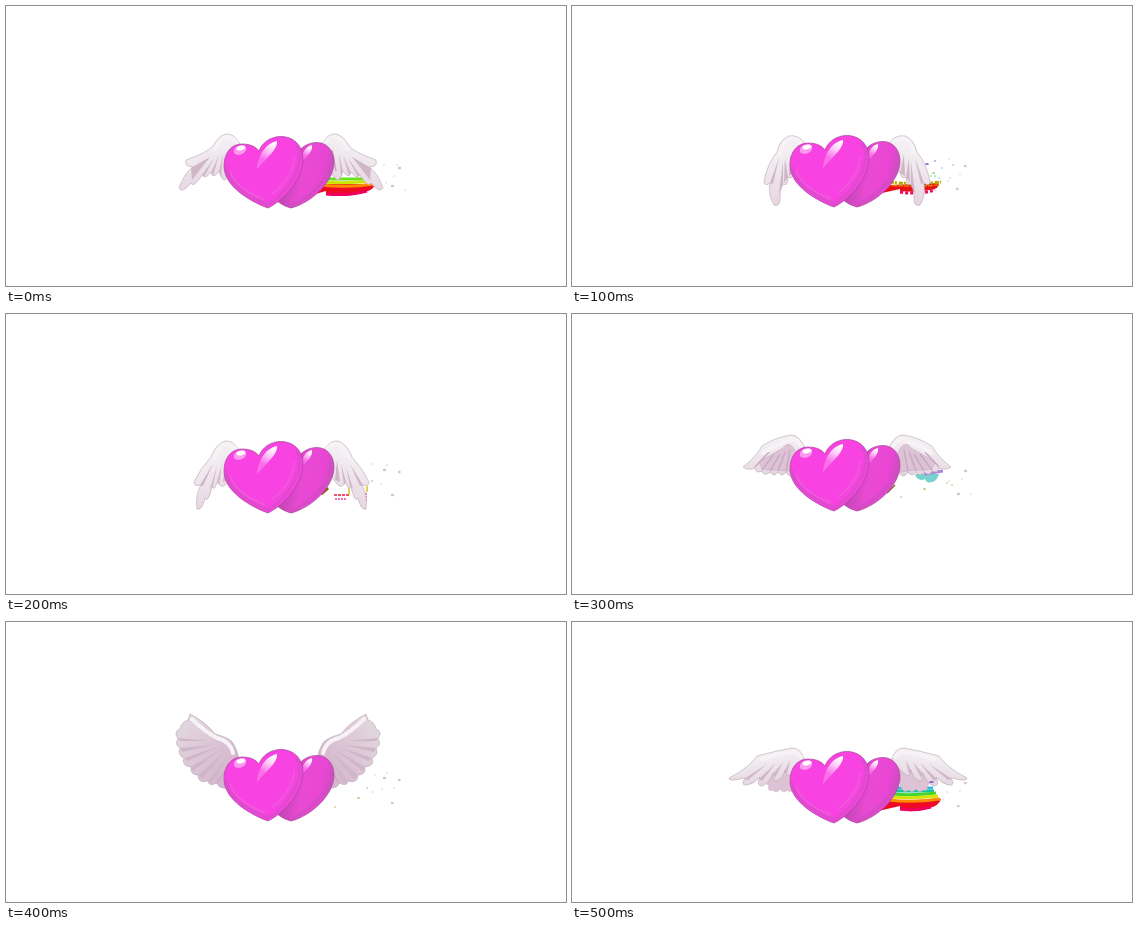
Write an HTML page without scripts that moves like this. It is 560 px wide and 280 px high and loops after 600 ms.

```html
<!DOCTYPE html>
<html lang="en">
<head>
<meta charset="utf-8">
<title>Winged hearts</title>
<style>
html, body { margin: 0; width: 100%; height: 100%; overflow: hidden; background: #fff; }
svg { display: block; width: 100%; height: 100%; }
.pose { visibility: hidden; animation: show 600ms step-end calc((var(--i) - 6) * 100ms) infinite; }
.hearts { animation: bob 600ms step-end infinite; }
@keyframes show { 0% { visibility: visible; } 16.667%, 100% { visibility: hidden; } }
@keyframes bob {
  0% { transform: translateY(0); }
  16.667% { transform: translateY(-1px); }
  33.333% { transform: translateY(-3px); }
  50% { transform: translateY(-5px); }
  66.667% { transform: translateY(-3px); }
  83.333% { transform: translateY(-1px); }
}
.wing { fill: url(#feather); stroke: #b5a8b0; stroke-width: .6; stroke-linejoin: round; }
.under { fill: #dec3d6; stroke: #c2a7b9; stroke-width: .5; }
.shade { fill: #cfb6c8; }
.vane { fill: none; stroke: #c8adc0; stroke-width: 1.6; }
.arm { fill: none; stroke: #f6f2f5; stroke-width: 4; stroke-linecap: round; }
.band { fill: none; stroke-width: 3; }
.thin { stroke-width: 1.5; }
.dust { fill: none; stroke: #d6c6cf; stroke-width: 2.4; stroke-linecap: round; }
.fine { stroke-width: 1.5; }
.green { stroke: #55d34e; }
.violet { stroke: #7445d0; }
.teal { stroke: #4cc5cc; }
.gold { stroke: #c6a064; }
.rim { stroke: #a3479b; stroke-width: .7; }
</style>
</head>
<body>
<svg viewBox="0 0 560 280">
<defs>
  <linearGradient id="feather" x1=".2" y1="0" x2=".5" y2="1">
    <stop offset=".3" stop-color="#f2eef1"/>
    <stop offset="1" stop-color="#e5d2df"/>
  </linearGradient>
  <linearGradient id="raised" x1="0" x2="1" y2=".8">
    <stop offset="0" stop-color="#e4dce1"/>
    <stop offset=".9" stop-color="#d6b6ce"/>
  </linearGradient>
  <linearGradient id="shine" x1=".7" y1="0" x2=".3" y2="1">
    <stop offset="0" stop-color="#fff"/>
    <stop offset=".3" stop-color="#ffd0f8"/>
    <stop offset=".7" stop-color="#f96cea"/>
  </linearGradient>
  <linearGradient id="back" x1="0" x2="1" y2=".2">
    <stop offset=".3" stop-color="#c746b8"/>
    <stop offset=".55" stop-color="#e84ad3"/>
    <stop offset=".85" stop-color="#ea45d5"/>
    <stop offset="1" stop-color="#d04fc0"/>
  </linearGradient>

  <g id="w0">
    <path class="wing" d="M234 138Q228 127 220 128Q212 130 207 140Q202 146 180 154Q178 161 187 161Q178 167 173 182Q176 188 185 177Q187 183 197 168Q198 175 205 166Q207 174 213 165Q216 175 219 174L228 165Z"/>
    <path class="shade" d="M185 162L204 151L186 174ZM196 169L208 152L198 171ZM205 167L213 149L207 170ZM213 166L217 148L215 171Z"/>
    <path class="vane" d="M220 165L224 144"/>
    <path class="arm" d="M231 137Q225 130 220 131Q213 134 209 143"/>
  </g>
  <g id="w1">
    <path class="wing" d="M234 138Q226 128 217 130Q208 133 205 146Q195 158 192 176Q193 181 198 177Q196 190 202 199Q208 201 208 193Q207 186 211 178Q216 181 216 171Q220 174 222 167L228 160Z"/>
    <path class="shade" d="M198 177L207 152L201 178ZM207 188L211 155L211 177ZM212 177L213 152L216 171ZM217 170L218 148L222 167Z"/>
    <path class="arm" d="M230 137Q223 131 217 133Q211 136 208 147"/>
  </g>
  <g id="w2">
    <path class="wing" d="M234 137Q227 126 219 127Q210 130 205 143Q194 155 188 168Q188 173 195 171Q189 181 191 195Q196 197 199 184Q202 190 206 173Q209 177 211 168Q216 175 219 171L228 160Z"/>
    <path class="shade" d="M194 171L207 150L197 172ZM204 175L211 152L207 172ZM211 168L216 150L213 171ZM217 168L220 146L222 166Z"/>
    <path class="arm" d="M231 136Q225 129 219 130Q212 133 208 144"/>
  </g>
  <g id="w3">
    <path class="wing" d="M234 136Q228 121 219 121Q204 123 190 132Q184 143 171 153Q177 157 183 154Q184 160 190 157Q192 163 198 158Q202 164 206 158Q210 164 214 158Q218 165 222 160L230 150Z"/>
    <path class="under" d="M187 148Q200 140 211 134Q217 125 224 138L222 158L214 157L206 156L198 156L190 155Z"/>
    <path class="vane" d="M183 153L197 138M190 156L202 140M198 157L208 140M206 157L213 138M214 157L218 136"/>
    <path class="arm" d="M230 134Q225 124 217 126Q205 130 191 139"/>
  </g>
  <g id="w4">
    <path class="wing" style="fill:url(#raised)" d="M184 92Q200 100 209 112Q224 116 227 121Q231 127 233 137L222 166Q212 167 211 161Q203 165 202 159Q192 162 192 153Q184 153 185 145Q175 144 178 136Q171 133 174 126Q168 122 172 117Q167 109 174 107Q175 100 182 98Z"/>
    <path class="shade" d="M172 116L202 119L174 119ZM174 126L207 123L176 130ZM178 136L211 125L182 139ZM185 145L214 128L187 149ZM192 153L218 131L196 157ZM202 159L221 135L206 161Z"/>
    <path class="vane" d="M211 161L224 142"/>
    <path class="arm" d="M186 97Q199 110 211 116Q224 119 227 131"/>
  </g>
  <g id="w5">
    <path class="under" d="M228 138L194 156Q193 163 197 163Q195 170 201 168Q205 172 208 167Q212 172 215 168Q220 172 223 165Z"/>
    <path class="wing" d="M232 137Q229 126 220 126Q203 129 185 134Q178 145 157 156Q156 160 173 156Q168 164 175 163Q182 162 188 155Q184 164 190 164Q198 161 201 151Q200 160 205 159Q211 156 213 148Q214 156 218 153L227 145Z"/>
    <path class="shade" d="M172 157L195 142L176 158ZM187 157L204 141L190 159ZM201 152L211 140L203 156ZM212 150L218 138L215 152Z"/>
    <path class="arm" d="M229 135Q224 129 218 130Q204 132 190 137"/>
  </g>
</defs>

<g class="pose" style="--i:0">
  <path fill="#ee0a25" d="M306 189L318 178H368Q369 184 358 186Q343 192 320 188V185Z"/>
  <path class="band" stroke="#6be01c" d="M317 173H361"/>
  <path class="band" stroke="#c9e500" d="M316 176Q340 178 366 175"/>
  <path class="band" stroke="#ff8a00" d="M315 179Q342 182 368 178"/>
  <path class="band" stroke="#f0005c" d="M320 188Q343 190 361 185"/>
  <use href="#w0"/><use href="#w0" transform="translate(550)scale(-1 1)"/>
  <path class="dust" d="M393 162h1M386 180h1"/>
  <path class="dust fine" d="M378 159h0M391 159h0M388 170h0M380 177h0M399 184h0"/>
</g>

<g class="pose" style="--i:1">
  <path fill="#ea1018" d="M310 187L318 179L367 177Q367 184 357 184Q343 187 328 185V183Z"/>
  <path class="band" stroke="#b6a800" stroke-dasharray="4 1 2 2" d="M318 176Q342 179 369 176"/>
  <path class="band thin" stroke="#e87900" stroke-dasharray="5 1" d="M314 179Q342 181 367 179"/>
  <path class="band" stroke="#ee0a61" stroke-dasharray="3 2" d="M328 186Q347 189 363 184"/>
  <use href="#w1"/><use href="#w1" transform="translate(550)scale(-1 1)"/>
  <path class="dust" d="M393 160h.5M385 183h.5"/>
  <path class="dust fine" d="M377 153h0M378 172h0M388 168h0M376 175h0"/>
  <path class="dust fine green" d="M361 167h1M363 170h0M359 170h0"/>
  <path class="dust fine violet" d="M354 158h2M363 155h0"/>
  <path class="dust fine teal" d="M370 162h0M381 159h0M367 172h0"/>
</g>

<g class="pose" style="--i:2">
  <path class="band" stroke="#985c13" d="M315 180L322 174"/>
  <path class="band thin" stroke="#ed123e" stroke-dasharray="3 1" d="M328 181H343"/>
  <path class="band thin" stroke="#e2bd20" d="M343 173V181M361 172V178"/>
  <path class="band thin" stroke="#f040a0" stroke-dasharray="2 1" d="M329 185H340M360 179V187"/>
  <use href="#w2"/><use href="#w2" transform="translate(551)scale(-1 1)"/>
  <path class="dust" d="M378 156h1M393 158h.5M386 181h1"/>
  <path class="dust fine" d="M366 150h0M381 151h0M375 170h0"/>
  <path class="dust fine green" d="M366 167h0"/>
</g>

<g class="pose" style="--i:3">
  <path fill="#79d2cf" d="M343 160H367Q364 169 359 168Q355 170 353 165Q348 168 344 163Z"/>
  <path class="band" stroke="#a889d8" d="M352 160L371 157"/>
  <path class="band thin" stroke="#8c5a28" d="M315 179L323 171"/>
  <use href="#w3"/><use href="#w3" transform="translate(550)scale(-1 1)"/>
  <path class="dust" d="M393 157h1M386 180h1"/>
  <path class="dust fine" d="M377 167h0M390 165h0M399 180h0"/>
  <path class="dust fine gold" d="M329 183h0M352 175h1M375 169h0M380 171h0"/>
</g>

<g class="pose" style="--i:4">
  <use href="#w4"/><use href="#w4" transform="translate(544)scale(-1 1)"/>
  <path class="dust" d="M378 156h1M393 158h.5M386 181h.5"/>
  <path class="dust fine" d="M369 153h0M381 151h0M367 170h0M376 167h0M388 166h0"/>
  <path class="dust fine gold" d="M329 185h0M352 176h1M361 166h0"/>
</g>

<g class="pose" style="--i:5">
  <path fill="#ee0a25" d="M306 189L318 179L369 177Q367 184 357 186Q343 191 328 188V184Z"/>
  <path class="band" stroke="#38b9ed" d="M326 166H361"/>
  <path class="band" stroke="#12c7a0" d="M323 169H362"/>
  <path class="band" stroke="#45d52b" d="M319 172Q341 174 364 171"/>
  <path class="band" stroke="#d5e300" d="M318 175Q341 177 366 174"/>
  <path class="band" stroke="#ff8a00" d="M316 178Q342 181 368 177"/>
  <path class="band" stroke="#f0005c" d="M328 187Q345 189 359 185"/>
  <use href="#w5"/><use href="#w5" transform="translate(552)scale(-1 1)"/>
  <path class="dust fine violet" d="M358 160h3"/>
  <path class="dust" d="M393 161h.5M386 184h.5"/>
  <path class="dust fine" d="M375 170h0M388 169h0M371 177h0"/>
</g>

<g class="hearts">
  <path class="rim" fill="url(#back)" d="M285 202C278 200 270 196 268 190L292 146C297 140 303 136.500 311 136.500C322 136.500 328 146 328 156C328 176 305 197 285 202Z"/>
  <path fill="none" stroke="#d44cc3" stroke-width="3" d="M325 152C326 172 303 193 285 200"/>
  <path fill="url(#shine)" d="M296 155C295 147 300 140 306 139C307 144 302 150 296 155Z"/>
  <path class="rim" fill="#f842e1" d="M262 202C248 197 218 182 218 160C218 146 226 138 236 138C245 138 250 141 253 145C256 137 264 130.500 275 130.500C288 130.500 297 140 297 153C297 172 280 193 262 202Z"/>
  <path fill="none" stroke="#df4bcd" stroke-width="3" d="M290 139C302 155 283 186 262 199C247 193 221 181 220 160"/>
  <path fill="none" stroke="#ee58db" stroke-width="2" d="M224 165C229 181 247 189 259 194M288 151C288 168 278 179 266 188"/>
  <path fill="url(#shine)" d="M251 163C252 149 260 137 271 135C272 142 264 149 251 163Z"/>
  <ellipse cx="234" cy="144" rx="6.500" ry="4.500" transform="rotate(-22 234 144)" fill="#fa9aee"/>
  <ellipse cx="235" cy="142" rx="4.500" ry="2.200" transform="rotate(-12 235 142)" fill="#fff"/>
</g>
</svg>
</body>
</html>
```
